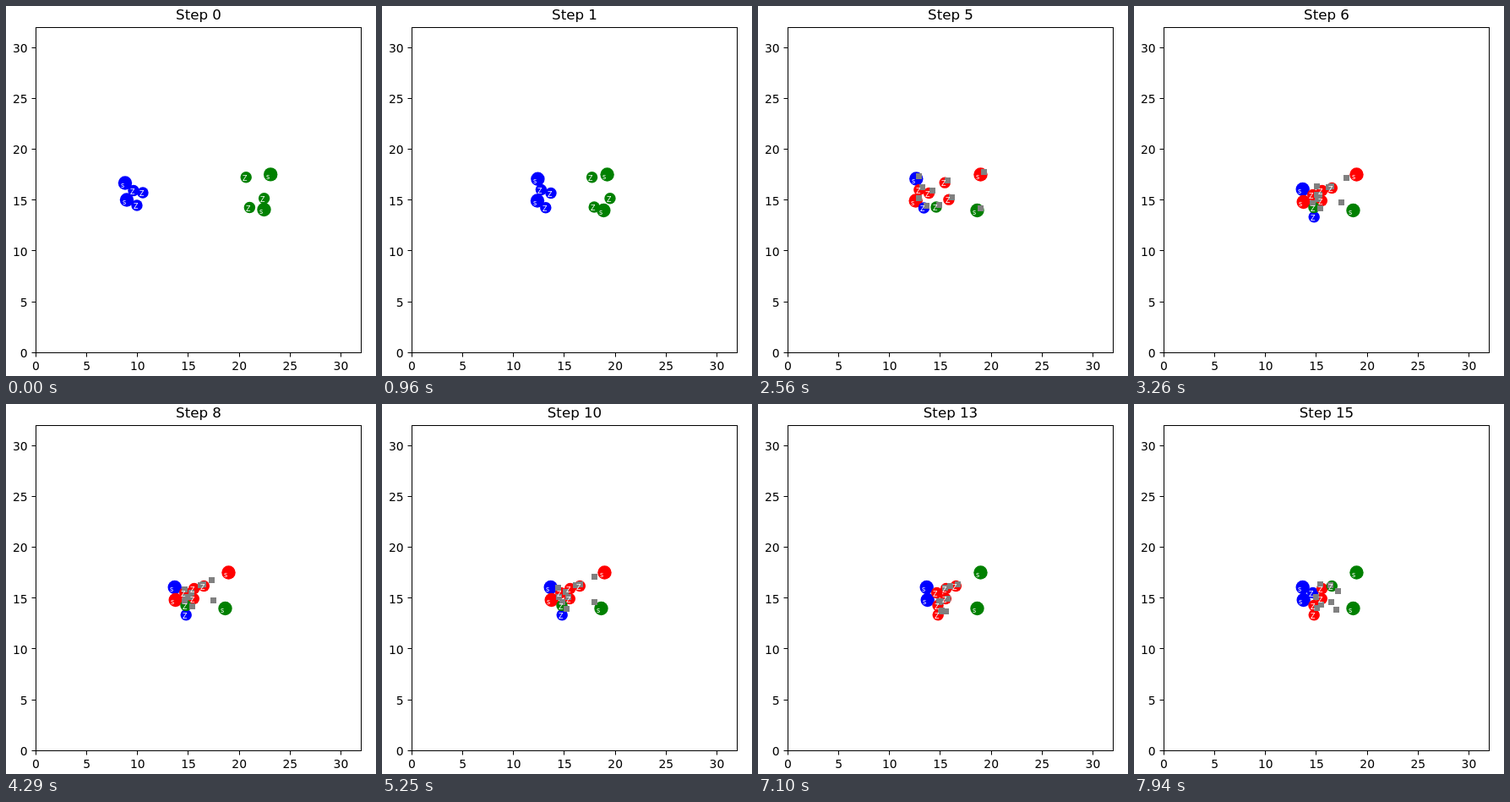
An HTML page with a canvas for the animation above (8000 ms loop, 438 by 438 pixels).

```html
<!DOCTYPE html>
<html lang="en">
<head>
<meta charset="utf-8">
<title>Unit skirmish</title>
<style>
  html, body { margin: 0; width: 100%; height: 100%; overflow: hidden; background: #fff; }
  canvas { display: block; width: 438px; height: 438px; }
</style>
</head>
<body>
<canvas id="stage"></canvas>
<script>
const SIZE = 438, LOOP = 8000, TICK = 64, SUBSTEPS = 8;
const LEFT = 35.5, RIGHT = 420.5, TOP = 25.5, BOTTOM = 410.5, UNIT = 385 / 32;
const FIRST_SHOT = 2, PHASE_STEPS = 3;

const canvas = document.getElementById('stage');
const ratio = window.devicePixelRatio || 1;
canvas.width = canvas.height = SIZE * ratio;
const ctx = canvas.getContext('2d');
ctx.scale(ratio, ratio);

// Shooters halt after two steps, green melee units after four.
// Targets hold one unit id per combat phase, '-' for none.
const unit = (letter, color, targets, start, meet, rest = meet) => ({
  letter, color, targets, start, meet, rest,
  radius: (letter === 's' ? 0.625 : 0.5) * UNIT,
  halt: letter === 'Z' && color === 'green' ? 32 : 16,
  regroup: color === 'blue' ? 40 : 32
});
const units = {
  a: unit('s', 'blue', 'hhijh', [141, 209.5], [187.3, 204.5], [199.7, 217]),
  b: unit('s', 'blue', 'hhijg', [143, 229.5], [186.7, 230.5], [200.7, 232]),
  c: unit('Z', 'blue', '-iijj', [151, 218.5], [190.9, 217.5], [211.7, 223.5]),
  d: unit('Z', 'blue', 'jhhhh', [162, 221], [202.5, 221.5], [222.7, 218.5]),
  e: unit('Z', 'blue', 'jiiij', [155, 236], [196.4, 239], [213.2, 249.7]),
  f: unit('s', 'green', 'ddbce', [313.2, 199.4], [263.5, 199.5]),
  g: unit('s', 'green', 'eccee', [305.5, 241], [259.5, 242]),
  h: unit('Z', 'green', '-dddd', [284.2, 202.8], [208.2, 202.8], [234.3, 215.5]),
  i: unit('Z', 'green', '-bbee', [305.6, 227.8], [229.6, 227.8], [222.3, 230.5]),
  j: unit('Z', 'green', '-bbee', [288.4, 238.5], [209, 237.5], [213, 238.5])
};
const hitByPhase = ['deij', 'bcdfhi', 'bcdfhi', 'cdehij', 'deij'];

const clamp = k => Math.max(0, Math.min(1, k));
const mix = (p, q, k) => [p[0] + (q[0] - p[0]) * k, p[1] + (q[1] - p[1]) * k];

function positionAt({ start, meet, rest, halt, regroup }, tick) {
  return tick <= halt
    ? mix(start, meet, tick / halt)
    : mix(meet, rest, clamp((tick - regroup) / (48 - regroup)));
}

function label(text, x, y, size, align, color = '#000') {
  ctx.font = `${size}px "DejaVu Sans", sans-serif`;
  ctx.textAlign = align;
  ctx.fillStyle = color;
  ctx.fillText(text, x, Math.round(y));
}

function line(x1, y1, x2, y2) {
  ctx.beginPath();
  ctx.moveTo(x1, y1);
  ctx.lineTo(x2, y2);
  ctx.stroke();
}

function drawAxes(step) {
  ctx.strokeStyle = '#000';
  ctx.lineWidth = 1;
  ctx.strokeRect(LEFT, TOP, RIGHT - LEFT, BOTTOM - TOP);
  for (let value = 0; value <= 30; value += 5) {
    const offset = value * UNIT;
    const x = Math.floor(LEFT + offset) + 0.5;
    const y = Math.floor(BOTTOM - 0.3 - offset) + 0.5;
    line(x, BOTTOM, x, BOTTOM + 5);
    line(LEFT - 5, y, LEFT, y);
    label(value, LEFT + offset, 430.5, 13.89, 'center');
    label(value, 25.7, BOTTOM + 5.5 - offset, 13.89, 'right');
  }
  label('Step ' + step, 228, 16, 16.67, 'center');
}

function draw(tick) {
  const step = Math.floor(tick / SUBSTEPS);
  const progress = (tick % SUBSTEPS) / SUBSTEPS;
  const phase = Math.floor((step - FIRST_SHOT) / PHASE_STEPS);
  const hit = hitByPhase[phase] || '';
  const all = Object.entries(units);
  const at = {};

  ctx.fillStyle = '#fff';
  ctx.fillRect(0, 0, SIZE, SIZE);

  for (const [id, u] of all) {
    at[id] = positionAt(u, tick);
    ctx.fillStyle = hit.includes(id) ? 'red' : u.color;
    ctx.beginPath();
    ctx.arc(...at[id], u.radius + 0.7, 0, 2 * Math.PI);
    ctx.fill();
  }

  // A shot's lower left corner travels from shooter to target.
  ctx.fillStyle = 'gray';
  for (const [id, u] of all) {
    const target = at[u.targets[phase]];
    if (!target) continue;
    const [x, y] = mix(at[id], target, progress);
    ctx.fillRect(Math.round(x), Math.round(y + 0.7) - 7, 7, 7);
  }

  drawAxes(step);
  for (const [id, u] of all) {
    const [x, y] = at[id], shift = u.radius * Math.SQRT1_2;
    label(u.letter, Math.round(x - shift), y + shift, 8.04, 'left', '#fff');
  }
}

const start = performance.now();
let shown = -1;
function play() {
  const time = Math.max(0, performance.now() - start) % LOOP;
  const tick = Math.min(124, Math.floor((Math.floor(time / 10) * 10 + 5) / TICK));
  if (tick !== shown) draw(shown = tick);
  requestAnimationFrame(play);
}
play();
</script>
</body>
</html>
```
